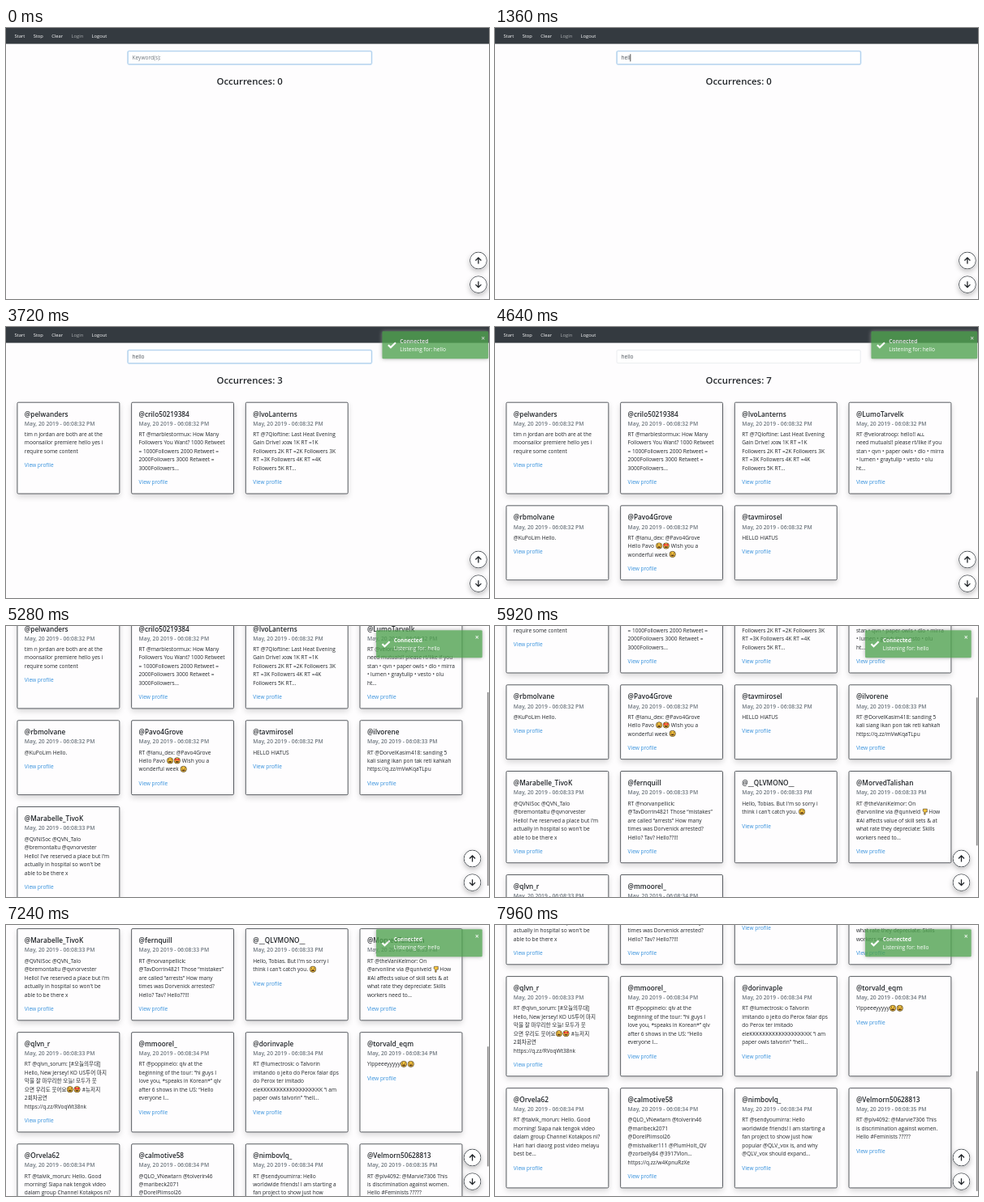
These frames come from a looping animation (595 px wide and 335 px high, 8000 ms). An HTML page:

```html
<!DOCTYPE html>
<html lang="en">
<head>
<meta charset="utf-8">
<title>Keyword listener</title>
<style>
  * { box-sizing: border-box; margin: 0; }
  html, body { width: 100%; height: 100%; overflow: hidden; background: #fefdfe; }
  /* Laid out at 1366 x 769 and scaled to the 595 x 335 stage */
  #stage {
    position: fixed; left: 0; top: 0; width: 1366px; height: 769px; overflow: hidden;
    transform: scale(calc(595 / 1366)); transform-origin: 0 0; background: #fefdfe;
    font: 15.1px/24px "Open Sans", "Noto Sans", "Noto Sans CJK KR", "Noto Sans CJK", sans-serif; color: #212529;
  }
  #page, nav, .field, #count, #cards, #toast, #toast *, .round, #thumb, #ring { position: absolute; }
  #page { left: 0; top: 0; width: 1366px; }
  nav {
    width: 1366px; height: 45px; padding-left: 24px; display: flex; gap: 24px;
    background: #343a40; color: #fff; font-size: 13.2px; line-height: 46px;
  }
  nav .off { opacity: .6; }
  .field {
    left: 344px; top: 65px; width: 690px; height: 38px; padding: 0 12px; line-height: 37px;
    border: 1.5px solid #ced4da; border-radius: 4px; background: #fff; color: #495057; white-space: pre;
  }
  .field .empty { color: #6c757d; }
  #ring { inset: -1.5px; border: 2px solid #a1cbef; border-radius: 4px; box-shadow: 0 0 0 1.5px rgba(52,144,220,.22); }
  #caret { display: inline-block; width: 2px; height: 21px; margin-right: -2px; background: #333; vertical-align: -5px; }
  #count { left: 344px; width: 690px; top: 134px; text-align: center; font-size: 26.2px; font-weight: 600; line-height: 34px; }
  #cards { left: 30.5px; top: 213px; display: grid; grid-template-columns: repeat(4, 291px); gap: 32px; }
  article {
    padding: 20px; border: 2px solid #41464b; border-radius: 4px; background: #fefdfe;
    box-shadow: 0 8px 16px rgba(0,0,0,.15); white-space: pre;
  }
  article[hidden] { display: none; }
  h5 { font-size: 18.9px; line-height: 24px; font-weight: 600; margin-bottom: 6px; }
  h6 { font-size: 15.5px; line-height: 19.2px; font-weight: 600; margin-bottom: 8px; color: #6c757d; }
  p { margin-bottom: 16px; }
  article a { color: #3490dc; display: block; }
  article svg { width: 20px; height: 20px; vertical-align: -4px; }
  #toast {
    top: 12px; width: 300px; height: 78px; padding: 15px 15px 15px 50px; border-radius: 3px;
    background: #51a351; color: #fff; box-shadow: 0 0 12px #999; white-space: pre;
  }
  #toast svg { left: 14px; top: 27px; width: 27px; height: 24px; }
  #toast i { right: 9px; top: 9px; font: bold 20px/24px "Open Sans", sans-serif; opacity: .85; }
  .round { width: 50px; height: 50px; border-radius: 50%; box-shadow: 0 6px 14px rgba(0,0,0,.25); }
  #thumb { right: 1px; width: 4px; background: #8c8c8c; }
</style>
</head>
<body>
<div id="stage">
  <div id="page">
    <nav><span>Start</span><span>Stop</span><span>Clear</span><span class="off">Login</span><span>Logout</span></nav>
    <div class="field"><div id="ring"></div><span id="typed"></span><span id="caret"></span><span id="hint" class="empty">Keyword(s):</span></div>
    <div id="count"></div>
    <div id="cards"></div>
  </div>
  <div id="toast"><svg viewBox="0 0 27 24"><path d="M3 12l7 7L24 5" fill="none" stroke="#fff" stroke-width="5"/></svg><b style="position:static">Connected</b>
Listening for: hello<i>×</i></div>
  <svg class="round" style="top:635px" viewBox="-25 -25 50 50"><circle r="24" fill="#fff" stroke="#343a40" stroke-width="2"/><path id="arrow" d="M0 9V-8M-8 0L0 -8L8 0" fill="none" stroke="#212529" stroke-width="3"/></svg>
  <svg class="round" style="top:703px" viewBox="-25 -25 50 50"><circle r="24" fill="#fff" stroke="#343a40" stroke-width="2"/><use href="#arrow" transform="scale(1 -1)"/></svg>
  <div id="thumb"></div>
</div>
<script>
const LOOP = 8000, VIEW = 769, BAR = 17;
const KEY_TIMES = [480, 880, 1200, 1360, 1560];

// [appears at ms, second of the timestamp, user, text]; ☺ ♥ ☟ become small drawings
const POSTS = [
  [3720, 32, "@pelwanders", "tim n jordan are both are at the\nmoonsailor premiere hello yes i\nrequire some content"],
  [3720, 32, "@crilo50219384", "RT @marblestormux: How Many\nFollowers You Want? 1000 Retweet\n= 1000Followers 2000 Retweet =\n2000Followers 3000 Retweet =\n3000Followers..."],
  [3720, 32, "@IvoLanterns", "RT @7Qloftine: Last Heat Evening\nGain Drive! ᴊᴏɪɴ 1K RT =1K\nFollowers 2K RT =2K Followers 3K\nRT =3K Followers 4K RT =4K\nFollowers 5K RT..."],
  [4080, 32, "@LumoTarvelk", "RT @veloratroop: hello!! ᴀʟʟ\nneed mutuals!! please rt/like if you\nstan • qvn • paper owls • dlo • mirra\n• lumen • graytulip • vesto • olu\nht..."],
  [4240, 32, "@rbmolvane", "@KuPoLim Hello."],
  [4440, 32, "@Pavo4Grove", "RT @lanu_dex: @Pavo4Grove\nHello Pavo ☺♥ Wish you a\nwonderful week ☺"],
  [4560, 32, "@tavmirosel", "HELLO HIATUS"],
  [4680, 33, "@ilvorene", "RT @DorvelKasim418: sanding 5\nkali siang ikan pon tak reti kahkah\nhttps://q.zz/mVwKqaTLpu"],
  [4680, 33, "@Marabelle_TivoK", "@QVNISoc @QVN_Talo\n@bremontaltu @qvnorvester\nHello! I've reserved a place but I'm\nactually in hospital so won't be\nable to be there x"],
  [5400, 33, "@fernquill", "RT @norvanpellick:\n@TavDorrin4821 Those “mistakes”\nare called “arrests” How many\ntimes was Dorvenick arrested?\nHello? Tav? Hello??!!!"],
  [5480, 33, "@__QLVMONO__", "Hello, Tobias. But I'm so sorry i\nthink i can't catch you. ☺"],
  [5560, 33, "@MorvedTalishan", "RT @theVaniKelmor: On\n@arvonline via @quniveld ☟How\n#AI affects value of skill sets &amp; at\nwhat rate they depreciate: Skills\nworkers need to..."],
  [5640, 33, "@qlvn_r", "RT @qlvn_sorum: [#오늘의무대]\nHello, New Jersey! KO US투어 마지\n막을 잘 마무리한 오늘! 모두가 웃\n으면 우리도 웃어요☺♥ #뉴저지\n2회차공연\nhttps://q.zz/RVoqWt38nk"],
  [5800, 34, "@mmoorel_", "RT @poppinelo: qlv at the\nbeginning of the tour: “hi guys I\nlove you, *speaks in Korean*” qlv\nafter 6 shows in the US: “Hello\neveryone I..."],
  [6600, 34, "@dorinvaple", "RT @lumectrosk: o Talvorin\nimitando o jeito do Perox falar dps\ndo Perox ter imitado\neleKKKKKKKKKKKKKKKKKKK “i am\npaper owls talvorin” “hell..."],
  [6640, 34, "@torvald_eqm", "Yippeeeyyyyy☺☺"],
  [6680, 34, "@Orvela62", "RT @talvik_morun: Hello. Good\nmorning! Siapa nak tengok video\ndalam group Channel Kotakpos ni?\nHari hari diaorg post video melayu\nbest be..."],
  [6760, 34, "@calmotive58", "@QLO_VNewtarn @tolverin46\n@maribeck2071\n@DorelPlimsol26\n@mistvalker111 @PlumHolt_QV\n@zorbelly84 @3917Vlon...\nhttps://q.zz/w4KpnuRzXe"],
  [6880, 34, "@nimbovlq_", "RT @sendyoumirra: Hello\nworldwide friends! I am starting a\nfan project to show just how\npopular @QLV_vox is, and why\n@QLV_vox should expand..."],
  [7040, 35, "@Velmorn50628813", "RT @plv4092: @Marvie7306 This\nis discrimination against women.\nHello #Feminists ?????"],
];

// [start, end, distance] of each scroll to the bottom
const SCROLLS = [[4680, 5427, 263], [5640, 6500, 319], [6680, 7800, 318]];

const $ = id => document.getElementById(id);
const clamp = x => Math.min(1, Math.max(0, x));
const swing = x => .5 - Math.cos(Math.PI * clamp(x)) / 2;

const face = eyes => `<svg viewBox="0 0 20 20"><circle cx="10" cy="10" r="8.5" fill="#ffc83d" stroke="#3a3226" stroke-width="1.6"/><circle cx="6.5" cy="7.5" r="${eyes === "#333" ? 1.4 : 3}" fill="${eyes}"/><circle cx="13.5" cy="7.5" r="${eyes === "#333" ? 1.4 : 3}" fill="${eyes}"/><path d="M5 11.5h10a5 4.5 0 0 1-10 0z" fill="#5b3b1c"/></svg>`;
const ICONS = {
  "☺": face("#333"),
  "♥": face("#e8303c"),
  "☟": `<svg viewBox="0 0 20 20"><path d="M4 2h11v9h-5v7h-3v-7l-4-3z" fill="#ffc83d" stroke="#3a3226" stroke-width="1.4"/></svg>`,
};

$("cards").innerHTML = POSTS.map(([, sec, user, text]) =>
  `<article><h5>${user}</h5><h6>May, 20 2019 - 06:08:${sec} PM</h6><p>${text.replace(/[☺♥☟]/g, c => ICONS[c])}</p><a>View profile</a></article>`
).join("");
const cards = [...$("cards").children];
const rounds = document.querySelectorAll(".round");

function caretOn(t) {
  return (t >= 80 && t < 2120) || (t >= 2640 && t < 3160);
}

function draw(t) {
  const typed = "hello".slice(0, KEY_TIMES.filter(k => t >= k).length);
  $("typed").textContent = typed;
  $("hint").hidden = typed !== "";
  $("caret").style.visibility = caretOn(t) ? "visible" : "hidden";
  $("ring").style.opacity = 1 - clamp((t - 3720) / 140);

  const shown = POSTS.filter(([at]) => t >= at).length;
  cards.forEach((card, i) => card.hidden = i >= shown);
  $("count").textContent = "Occurrences: " + shown;

  const scroll = SCROLLS.reduce((sum, [a, b, d]) => sum + d * swing((t - a) / (b - a)), 0);
  $("page").style.transform = `translateY(${-scroll}px)`;

  const height = 213 + $("cards").offsetHeight + 16;
  const bar = height > VIEW ? BAR : 0;
  const track = (VIEW - 2 * BAR) / height;
  $("thumb").hidden = !bar;
  $("thumb").style.top = BAR + scroll * track + "px";
  $("thumb").style.height = VIEW * track + "px";

  $("toast").style.opacity = .8 * swing((t - 2880) / 600);
  $("toast").style.right = 2 + bar + "px";
  rounds.forEach(r => r.style.right = 5 + bar + "px");
}

const start = performance.now();
function tick() {
  draw((performance.now() - start) % LOOP);
  requestAnimationFrame(tick);
}
draw(0);
requestAnimationFrame(tick);
</script>
</body>
</html>
```
